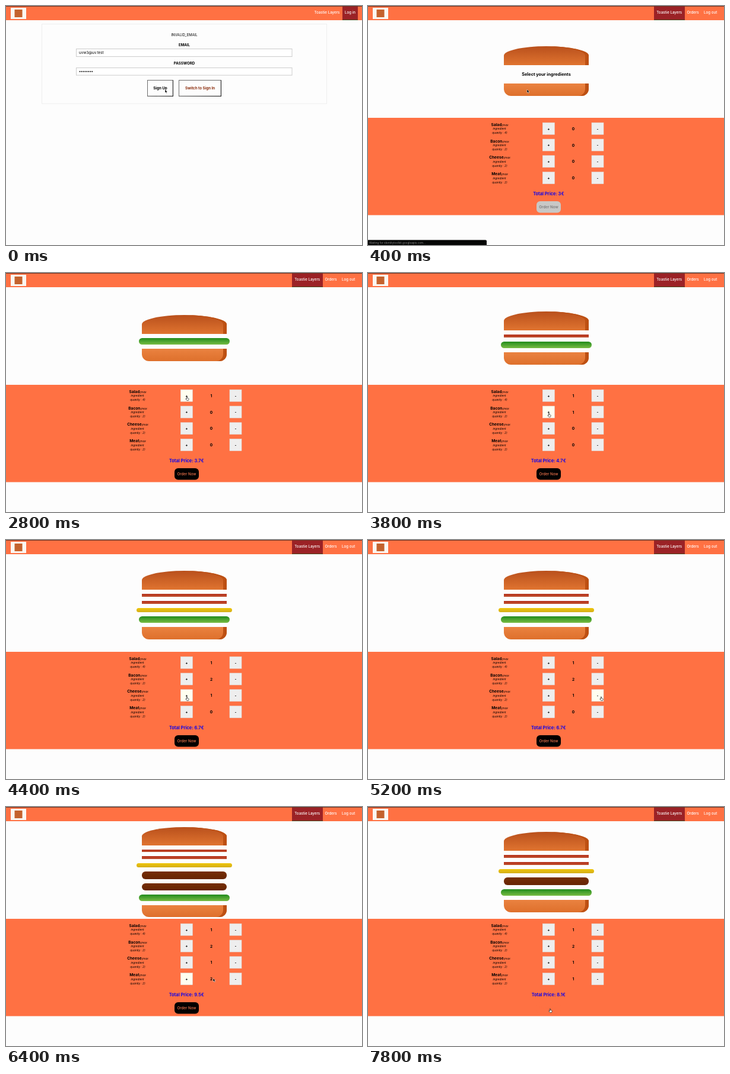
Write an HTML page that moves like this. It is 600 px wide and 404 px high and loops after 8 s.

```html
<!DOCTYPE html>
<html lang="en">
<head>
<meta charset="utf-8">
<title>Toastie Layers</title>
<style>
  html, body { margin: 0; width: 100%; height: 100%; overflow: hidden; background: #fdfdfd; }
  svg { position: absolute; left: 0; top: 0; display: block; }
  text { font-family: Inter, Roboto, sans-serif; font-size: 6.2px; }
  .mid { text-anchor: middle; }
  .bold { font-weight: 700; }
  .nav { fill: #fff; font-weight: 500; }
  .coral { fill: #ff7143; }
  .active { fill: #9b2226; }
  .field { fill: #fff; stroke: #ccc; }
  .note { font-size: 4.7px; font-style: italic; font-weight: 400; }
  .step { fill: #eee; stroke: #dcdcdc; stroke-width: .6; }
  .step.hover { fill: #fffff0; }
  #price { font-size: 7.4px; fill: #1206e8; }
  #order rect { fill: #000; }
  #order text { fill: #f0744c; font-weight: 500; }
  #order.off rect { fill: #c8c8c6; }
  #order.off text { fill: #858585; font-weight: 700; }
  #order.hover rect, #order.hover text { fill: #ff7143; }

  #burger {
    position: absolute; left: 211px; top: 30.2px; width: 179px; height: 159.5px;
    display: flex; flex-direction: column; justify-content: center;
  }
  #burger div { margin: 2% auto; width: 80%; }
  #burger .top {
    height: 20%; border-radius: 50% 50% 0 0;
    background: linear-gradient(#b9501c, #e07430); box-shadow: inset -6px 0 #bd5013;
  }
  #burger .bottom {
    height: 13%; border-radius: 0 0 12px 12px;
    background: linear-gradient(#ea8240, #de702c); box-shadow: inset -6px 0 #bd5013;
  }
  #burger .bacon { height: 3%; background: linear-gradient(#b5301a, #c05030); }
  #burger .cheese { height: 4.5%; width: 90%; border-radius: 8px; background: linear-gradient(#efc60c, #d4ae18); }
  #burger .meat { height: 8%; border-radius: 6px; background: linear-gradient(#762e06, #672504); }
  #burger .salad { height: 7%; width: 85%; border-radius: 8px; background: linear-gradient(#228c1d, #78bc44); }
  #burger .empty {
    height: 24.8px; width: 100%; margin: 0 auto; text-align: center;
    font: 700 7.3px/25.5px Inter, Roboto, sans-serif;
  }
</style>
</head>
<body>
<svg width="600" height="404" viewBox="0 0 600 404">
  <rect class="coral" width="600" height="24"/>

  <g id="login">
    <rect class="active" x="567" width="26" height="24"/>
    <rect x="567" y="23" width="26" height="1" fill="#4c4a1c"/>
    <text class="nav" x="519.5" y="12.8">Toastie Layers</text>
    <text class="nav" x="571" y="12.8">Log in</text>
    <rect x="60.5" y="30.5" width="480" height="134.5" fill="none" stroke="#eee"/>
    <text class="mid" x="300.5" y="50.5" style="font-size:6px">INVALID_EMAIL</text>
    <text class="mid bold" x="300.5" y="68.3" style="font-size:6px">EMAIL</text>
    <rect class="field" x="118.5" y="72.5" width="363.5" height="13"/>
    <text x="123" y="81.3">uvw3@uv.test</text>
    <text class="mid bold" x="300.5" y="99.3">PASSWORD</text>
    <rect class="field" x="118.5" y="104.5" width="363.5" height="12.5"/>
    <path d="M124.5 110.8h21" fill="none" stroke="#000" stroke-width="1.9" stroke-linecap="round" stroke-dasharray="0 2.95"/>
    <g id="choices"></g>
  </g>

  <g id="builder">
    <rect class="active" x="482" width="52" height="24"/>
    <rect x="482" y="23" width="52" height="1" fill="#4c4a1c"/>
    <text class="nav" x="486.3" y="12.8">Toastie Layers</text>
    <text class="nav" x="537.5" y="12.8">Orders</text>
    <text class="nav" x="566" y="12.8">Log out</text>
    <rect class="coral" y="189" width="600" height="164.5"/>
    <g id="rows"></g>
    <text id="price" class="mid bold" x="304.3" y="320"></text>
    <g id="order">
      <rect x="284" y="330" width="41" height="19.5" rx="6"/>
      <text class="mid" x="304.5" y="342.2">Order Now</text>
    </g>
  </g>

  <rect width="600" height="1" fill="#6b3020"/>
  <rect x="8" y="3" width="26" height="19" fill="#fbf7f2"/>
  <rect x="14.5" y="6" width="13" height="13" fill="#c4622d"/>

  <g id="status">
    <path d="M0 395.5h198q2 0 2 2V404H0z" fill="#050605"/>
    <text x="2" y="401.6" fill="#858585" style="font-size:4.65px">Waiting for identitytoolkit.googleapis.com...</text>
  </g>
</svg>

<div id="burger"></div>

<svg width="600" height="404" viewBox="0 0 600 404">
  <g id="cursor" stroke-linejoin="round">
    <path id="arrow" d="M0 0v5.6l1.3-1.1 1 2 1-.5-.9-1.9h1.7z" fill="#000" stroke="#fff" stroke-width=".5"/>
    <path id="hand" d="M-.7.2q.7-.6 1.2 0v2.2l2.2.6q.6.4.4 1.6l-.7 1.8h-2.6L-2.2 4q0-.9.8-.6l.7.6z" fill="#fff" stroke="#000" stroke-width=".6"/>
  </g>
</svg>

<script>
const LOOP = 8000, TICK = 200, BASE_PRICE = 3;
const $ = id => document.getElementById(id);

const items = [
  { id: 'salad', max: 4, price: 0.7 },
  { id: 'bacon', max: 2, price: 1 },
  { id: 'cheese', max: 2, price: 1 },
  { id: 'meat', max: 2, price: 1.4 }
];
const layers = ['bacon', 'cheese', 'meat', 'salad'];

// time, ingredient, change
const clicks = [
  [2200, 'salad', 1], [3600, 'bacon', 1], [4000, 'bacon', 1],
  [4400, 'cheese', 1], [4600, 'cheese', 1], [5200, 'cheese', -1],
  [5800, 'meat', 1], [6000, 'meat', 1], [7000, 'meat', -1]
];

// time, x, y of the pointer
const path = [
  [0, 268, 141], [1000, 268, 141], [1800, 282, 134.5], [2200, 305, 209],
  [2800, 305, 209], [3400, 305, 237], [4000, 305, 237], [4300, 305, 265],
  [4600, 305, 265], [5000, 393, 265], [5200, 393, 265], [5600, 305, 292],
  [6200, 305, 292], [6400, 349, 289.5], [6600, 387, 292], [7000, 387, 292],
  [7400, 307, 341], [8000, 307, 341]
];

const hotspots = [{ el: $('order'), x: 284, y: 330, w: 41, h: 19.5 }];

function choice(x, w, label, color) {
  return `<rect x="${x}" y="125" width="${w}" height="28" fill="#222"/>
    <path d="M${x} 153v-28h${w}l-1 1v26z" fill="#6c6c6c"/>
    <rect x="${x + 1}" y="126" width="${w - 2.2}" height="25.8" fill="#fdfdfd"/>
    <text class="mid bold" x="${x + w / 2}" y="141.3" fill="${color}">${label}</text>`;
}
$('choices').innerHTML = choice(238, 44, 'Sign Up', '#000') +
  choice(291, 72, 'Switch to Sign In', '#8b2c0c');

function row({ id, max }, i) {
  const y = 197.2 + i * 27.8;
  const name = id[0].toUpperCase() + id.slice(1);
  const button = (x, sign) =>
    `<rect id="${id}${sign}" class="step" x="${x}" y="${y}" width="20" height="20"/>
     <text class="mid bold" x="${x + 10}" y="${y + 12.3}">${sign}</text>`;
  return `<text class="mid bold" x="222" y="${y + 5.5}" style="font-size:6.6px">${name}<tspan class="note">(max</tspan></text>
    <text class="mid note" x="221.5" y="${y + 12}">ingredient</text>
    <text class="mid note" x="222" y="${y + 19.2}">quanity : ${max})</text>
    ${button(294.3, '+')}${button(377, '-')}
    <text id="${id}Count" class="mid bold" x="346" y="${y + 12.5}" style="font-size:6.6px"></text>`;
}
$('rows').innerHTML = items.map(row).join('');
items.forEach(({ id }, i) => {
  const y = 197.2 + i * 27.8;
  hotspots.push({ el: $(id + '+'), x: 294.3, y, w: 20, h: 20 },
                { el: $(id + '-'), x: 377, y, w: 20, h: 20 });
});

function pointerAt(t) {
  const i = Math.max(1, path.findIndex(p => p[0] >= t));
  const [t0, x0, y0] = path[i - 1], [t1, x1, y1] = path[i];
  const k = Math.max(0, (t - t0) / (t1 - t0));
  return [x0 + (x1 - x0) * k, y0 + (y1 - y0) * k];
}

const spotAt = ([x, y]) =>
  hotspots.find(s => x >= s.x && x <= s.x + s.w && y >= s.y && y <= s.y + s.h);

const show = (el, on) => { el.style.display = on ? '' : 'none'; };

function render(t) {
  const signedIn = t >= 400;
  show($('login'), !signedIn);
  show($('builder'), signedIn);
  show($('burger'), signedIn);
  show($('status'), t >= 200 && t < 800);

  const count = {};
  let price = BASE_PRICE, total = 0;
  for (const item of items) {
    const n = clicks.reduce((sum, [at, id, d]) => sum + (id === item.id && at <= t ? d : 0), 0);
    count[item.id] = n;
    price += n * item.price;
    total += n;
    $(item.id + 'Count').textContent = n;
  }
  $('price').textContent = `Total Price: ${+price.toFixed(1)}€`;

  const filling = total
    ? layers.map(id => `<div class="${id}"></div>`.repeat(count[id])).join('')
    : '<div class="empty">Select your ingredients</div>';
  $('burger').innerHTML = `<div class="top"></div>${filling}<div class="bottom"></div>`;

  // Hover colours fade in and out one tick behind the pointer.
  const lit = spotAt(pointerAt(Math.max(0, t - TICK)));
  for (const s of hotspots) s.el.classList.toggle('hover', s === lit);
  $('order').classList.toggle('off', !total);

  const pos = pointerAt(t), onButton = signedIn && !!spotAt(pos);
  $('cursor').setAttribute('transform', `translate(${pos})`);
  show($('hand'), onButton);
  show($('arrow'), !onButton);
}

let last = -1;
function frame() {
  const t = Math.floor(performance.now() % LOOP / TICK) * TICK;
  if (t !== last) render(last = t);
  requestAnimationFrame(frame);
}
frame();
</script>
</body>
</html>
```
